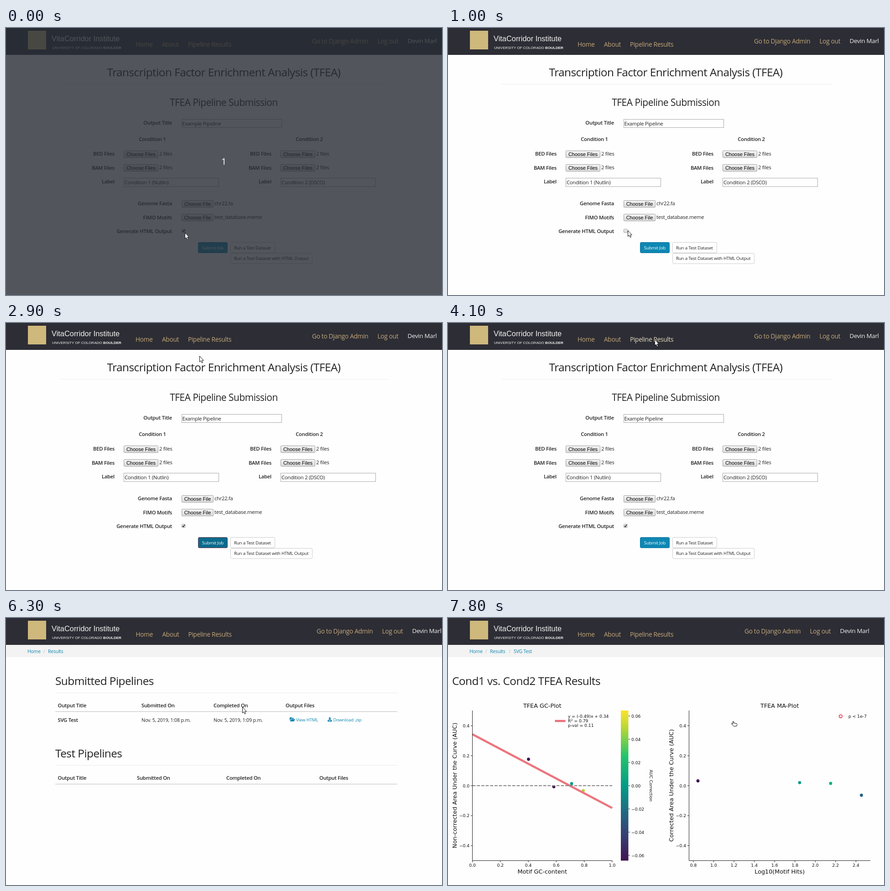
These frames come from a looping animation (956 by 586 pixels, 8 s). An HTML page:

```html
<!DOCTYPE html>
<html lang="en">
<head>
<meta charset="utf-8">
<title>Pipeline demo</title>
<style>
  html, body { margin: 0; width: 100%; height: 100%; overflow: hidden; background: #fefefe; }
  svg { display: block; width: 100vw; height: 100vh; }
  text { font: 11.2px "Open Sans", "Noto Sans", sans-serif; letter-spacing: -.0227em; fill: #222; white-space: pre; }
  .h1 { font-size: 24.4px; }
  .h2 { font-size: 20.9px; }
  .b { font-size: 11.3px; font-weight: 600; }
  .td { font-size: 10.8px; }
  .nav { font-size: 13.7px; fill: #c3a878; }
  .nav.hot { fill: #e8dcc0; }
  .user { font-size: 13.4px; fill: #eee; }
  .small { font-size: 9.8px; }
  .crumb { font-size: 10.5px; }
  .link { fill: #0f87b0; }
  .sep { fill: #bbb; }
  .white { fill: #fff; }
  .sys { font: 11px "Liberation Sans", Arial, sans-serif; letter-spacing: 0; fill: #000; }
  .brand { font: 16.4px "Liberation Sans", Arial, sans-serif; letter-spacing: 0; fill: #f2f2f2; }
  .uni { font: 8.05px "Liberation Sans", Arial, sans-serif; letter-spacing: 0; fill: #f2f2f2; }
  .plot text { font: 9.2px "DejaVu Sans", sans-serif; letter-spacing: 0; fill: #111; }
  .plot .label { font-size: 12.8px; }
  .end { text-anchor: end; }
  .mid { text-anchor: middle; }
  .field { fill: #fff; stroke: #a9a9a9; }
  .key { fill: url(#key); stroke: #a0a0a0; }
  .ghost { fill: #fff; stroke: #ccc; }
  .axis { fill: none; stroke: #222; stroke-width: 1; }
  #submit { fill: #0f87b3; stroke: #0b76a0; }
  #submit.hot { fill: #0b6b8c; }
  #submit.focus { fill: #0b6b8c; stroke: #75384b; }
</style>
</head>
<body>
<svg id="stage" viewBox="0 0 956 586" preserveAspectRatio="none">
  <defs>
    <linearGradient id="key" x2="0" y2="1">
      <stop stop-color="#f4f4f4"/><stop offset="1" stop-color="#dadada"/>
    </linearGradient>
    <linearGradient id="viridis" x2="0" y2="1">
      <stop stop-color="#fde32b"/><stop offset=".12" stop-color="#b5d635"/>
      <stop offset=".3" stop-color="#26c46c"/><stop offset=".5" stop-color="#049c86"/>
      <stop offset=".66" stop-color="#1f6d82"/><stop offset=".82" stop-color="#364276"/>
      <stop offset="1" stop-color="#401550"/>
    </linearGradient>
  </defs>
  <g id="form"></g>
  <g id="list"></g>
  <g id="plots"></g>
  <g id="dim">
    <rect width="956" height="586" fill="#272c34" fill-opacity=".8"/>
    <text x="477.5" y="300" class="mid white" style="font-size:20px">1</text>
  </g>
  <g id="cursor">
    <path id="arrow" d="M.5 .5V13.5L3.4 10.9 5.4 15.6 7.6 14.7 5.6 10.1H9.3Z" fill="#fff" stroke="#111"/>
    <path id="hand" d="M.5 1.2Q1.4 -.4 2.4 1V4.4L9 5.5Q10 6 9.8 7.5L8.8 11.5H2.5L-2.4 6.5Q-2.6 4.8 -1 5.2L.5 6.5Z" fill="#fff" stroke="#111"/>
  </g>
</svg>
<script>
const $ = id => document.getElementById(id);
const text = (x, y, s, cls = '', extra = '') => `<text x="${x}" y="${y}" class="${cls}" ${extra}>${s}</text>`;
const rect = (x, y, w, h, cls, extra = '') => `<rect x="${x}" y="${y}" width="${w}" height="${h}" class="${cls}" ${extra}/>`;
const line = (x1, y1, x2, y2, color) => `<path d="M${x1} ${y1}L${x2} ${y2}" stroke="${color}"/>`;
const dot = (x, y, color) => `<circle cx="${x}" cy="${y}" r="3.4" fill="${color}"/>`;
const range = (n, fn) => Array.from({ length: n }, (_, i) => fn(i)).join('');

const header = (left, right) =>
  rect(0, 0, 956, 59, '', 'fill="#2d2d35"') +
  rect(48, 6, 40, 41, '', 'fill="#cfb87c"') +
  text(100, 29, 'VitaCorridor Institute', 'brand') +
  text(101, 45.5, 'UNIVERSITY OF COLORADO <tspan font-weight="700">BOULDER</tspan>', 'uni') +
  text(left, 41, 'Home', 'nav') + text(left + 58, 41, 'About', 'nav') +
  text(left + 115, 41, 'Pipeline Results', 'nav results') +
  text(right, 34, 'Go to Django Admin', 'nav') + text(right + 143.5, 34, 'Log out', 'nav') +
  text(right + 209.5, 33, 'Devin Marl', 'user');

const crumbs = last =>
  rect(0, 59, 956, 27, '', 'fill="#f3f3f3"') +
  text(47, 76.5, 'Home', 'crumb link') + text(82, 76.5, '/', 'crumb sep') +
  text(92, 76.5, 'Results', 'crumb link') +
  (last ? text(133.5, 76.5, '/', 'crumb sep') + text(144, 76.5, last, 'crumb link') : '');

const picker = (x, y, w, label, file) =>
  rect(x + .5, y + .5, w, 15, 'key', 'rx="1"') +
  text(x + .5 + w / 2, y + 11.5, label, 'sys mid') + text(x + w + 3, y + 10.5, file);

const condition = (dx, n, label) =>
  text(dx + 321, 248, 'Condition ' + n, 'b mid') +
  ['BED', 'BAM'].map((kind, i) =>
    text(dx + 238, 280 + i * 30.5, kind + ' Files', 'b end') +
    picker(dx + 258, 269 + i * 30, 75, 'Choose Files', '2 files')).join('') +
  text(dx + 238, 341, 'Label', 'b end') +
  rect(dx + 258.5, 329.5, 208, 18.5, 'field') + text(dx + 260, 343, label);

$('form').innerHTML = header(284, 671) +
  text(477.5, 106, 'Transcription Factor Enrichment Analysis (TFEA)', 'h1 mid') +
  line(117, 123.5, 840, 123.5, '#eee') +
  text(477.5, 170.5, 'TFEA Pipeline Submission', 'h2 mid') +
  text(364, 212, 'Output Title', 'b end') +
  rect(385.5, 200.5, 219, 18, 'field') + text(386.5, 213.5, 'Example Pipeline') +
  condition(0, 1, 'Condition 1 (Nutlin)') + condition(344, 2, 'Condition 2 (DSCO)') +
  text(364, 389, 'Genome Fasta', 'b end') + picker(385, 378, 69, 'Choose File', 'chr22.fa') +
  text(364, 419.5, 'FIMO Motifs', 'b end') + picker(385, 408, 69, 'Choose File', 'test_database.meme') +
  text(364, 450, 'Generate HTML Output', 'b end') +
  rect(385.5, 441.5, 7.5, 7.5, 'key', 'rx="1"') +
  '<path id="tick" d="M387 445.2L388.8 447.2 391.8 442.8" fill="none" stroke="#222" stroke-width="1.6"/>' +
  rect(421.5, 470.5, 64, 23, '', 'id="submit" rx="2.5"') + text(453.5, 485.5, 'Submit Job', 'small white mid') +
  rect(492.5, 470.5, 97, 23, 'ghost', 'rx="2.5"') + text(500, 485.5, 'Run a Test Dataset', 'small') +
  rect(492.5, 494.5, 179, 22.5, 'ghost', 'rx="2.5"') + text(500, 509, 'Run a Test Dataset with HTML Output', 'small');

const table = (y, title, columns) =>
  text(108, y, title, 'h1') + line(108, y + 17.5, 859, y + 17.5, '#eaeaea') +
  ['Output Title', 'Submitted On', 'Completed On', 'Output Files']
    .map((s, i) => text(columns[i], y + 49, s, 'b')).join('') +
  line(108, y + 58.5, 858, y + 58.5, '#bbb');

$('list').innerHTML = header(284.5, 681) + crumbs() +
  table(147, 'Submitted Pipelines', [113.5, 297, 455, 613]) +
  text(113.5, 227.5, 'SVG Test', 'b') +
  text(297, 227.5, 'Nov. 5, 2019, 1:08 p.m.', 'td') + text(455, 227.5, 'Nov. 5, 2019, 1:09 p.m.', 'td') +
  '<path class="link" d="M622 219Q622 218 623 218H626L627 219.3H631V221.3H625L622 225.5ZM625.4 222H634L631.4 227H622.6Z"/>' +
  text(636, 226.8, 'View HTML', 'small link') +
  '<path class="link" d="M708.7 217.5H711.3V221H713.6L710 224.6 706.4 221H708.7ZM705.3 224H708L710 225.8 712 224H714.7V227.3H705.3Z"/>' +
  text(717.5, 226.8, 'Download .zip', 'small link') +
  table(306, 'Test Pipelines', [113.5, 287, 483, 687]);

const signed = (v, digits) => v.toFixed(digits).replace('-', '\u2212');
const yAt = v => 368 - v * 329;
const axes = (x0, x1, title, xLabel, yLabel) =>
  `<path class="axis" d="M${x0} 203V532.5H${x1}"/>` +
  range(5, i => {
    const v = (i - 2) / 5, y = yAt(v);
    return line(x0 - 3.5, y, x0, y, '#222') + text(x0 - 6.5, y + 3.5, signed(v, 1), 'end');
  }) +
  text((x0 + x1) / 2, 197, title, 'label mid') +
  text((x0 + x1) / 2, 561, xLabel, 'label mid') +
  text(0, 0, yLabel, 'label mid', `transform="translate(${x0 - 35} 367.5) rotate(-90)"`);
const xTicks = (n, x, step, first) => range(n, i =>
  line(x + i * step, 532.5, x + i * step, 536, '#222') +
  text(x + i * step, 546, (first + i * .2).toFixed(1), 'mid'));

$('plots').innerHTML = header(284, 650) + crumbs('SVG Test') +
  text(9, 147, 'Cond1 vs. Cond2 TFEA Results', 'h1') +
  '<g class="plot">' +
  dot(176.5, 310, '#3f1254') + dot(232, 370.3, '#3f1254') +
  dot(271, 363.5, '#0a9d86') + dot(296.5, 379, '#b2d43a') +
  `<path d="M53.5 ${yAt(.343)}L360 ${yAt(-.149)}" stroke="#ea6f78" stroke-width="4.6" stroke-opacity=".95"/>` +
  '<path d="M53.5 368H360" stroke="#858585" stroke-width="1.8" stroke-dasharray="6.8 2.9"/>' +
  axes(53.5, 360, 'TFEA GC-Plot', 'Motif GC-content', 'Non-corrected Area Under the Curve (AUC)') +
  xTicks(6, 53.5, 61.3, 0) +
  '<path d="M234.5 226H257.5" stroke="#ea6f78" stroke-width="4.6"/>' +
  text(263, 218.5, 'y = (-0.49)x + 0.34') +
  text(263, 229.2, 'R<tspan dy="-3.2" font-size="6.4">2</tspan><tspan dy="3.2"> = 0.79</tspan>') +
  text(263, 239.3, 'p-val = 0.11') +
  rect(379, 203, 16.5, 329.5, '', 'fill="url(#viridis)"') +
  range(7, i => line(395.5, 215 + i * 51, 399, 215 + i * 51, '#222') +
    text(402, 218.5 + i * 51, signed(.06 - i * .02 + 1e-9, 2))) +
  text(0, 0, 'AUC Correction', 'mid', 'transform="translate(441.5 368) rotate(90)"') +
  axes(528.5, 926, 'TFEA MA-Plot', 'Log10(Motif Hits)', 'Corrected Area Under the Curve (AUC)') +
  xTicks(9, 538, 44.56, .8) +
  dot(548, 357.5, '#3f1254') + dot(771, 361.3, '#0a9d86') +
  dot(839, 363, '#10b07c') + dot(906.5, 389, '#1f6185') +
  '<circle cx="861" cy="215.7" r="3.3" fill="#fff" stroke="#d6152b" stroke-width="1.3"/>' +
  text(878, 219, 'p &lt; 1e-7') + '</g>';

// Pointer path: time, x, y
const path = [
  [0, 392, 449], [100, 389, 451], [300, 389, 451], [400, 394, 465], [600, 445, 476],
  [700, 462, 474], [800, 448, 451], [1000, 394, 444], [1200, 394, 444], [1500, 401, 462],
  [2000, 450, 477], [2200, 450, 477], [2300, 440, 455], [2500, 357, 243], [2600, 357, 243],
  [2900, 424, 72], [3100, 446, 42], [3400, 451, 37], [3900, 451, 37], [4100, 453, 36],
  [5000, 453, 36], [5600, 427, 67], [5700, 427, 67], [5900, 406, 121], [6000, 406, 124],
  [6300, 518, 195], [6500, 752, 227], [6700, 608, 227], [6800, 608, 227],
  [7000, 624, 226], [8000, 624, 226]
];
function pointer(t) {
  const i = path.findIndex(p => p[0] > t);
  const [t0, x0, y0] = path[i - 1], [t1, x1, y1] = path[i];
  const k = (t - t0) / (t1 - t0);
  return [x0 + (x1 - x0) * k, y0 + (y1 - y0) * k];
}
const show = (id, on) => $(id).style.display = on ? '' : 'none';
const results = document.querySelector('#form .results');

function draw() {
  const t = Math.floor(performance.now() % 8000 / 100) * 100;
  const [x, y] = pointer(t);
  show('form', t < 5000);
  show('list', t >= 5000 && t < 7400);
  show('plots', t >= 7400);
  show('dim', t < 100);
  show('tick', t < 1000 || t >= 1200);
  const overSubmit = t < 5000 && x > 421 && x < 486 && y > 470 && y < 494;
  $('submit').classList.toggle('hot', overSubmit);
  $('submit').classList.toggle('focus', t >= 2300 && t < 4000);
  const overResults = t < 5000 && x > 399 && y < 46;
  results.classList.toggle('hot', overResults);
  const overLink = overResults || t >= 7000 || (t > 6300 && t < 6700 && x > 621);
  const hand = overLink && t >= 6300;
  show('hand', hand);
  show('arrow', !hand);
  $('cursor').setAttribute('transform', `translate(${x} ${y})`);
  requestAnimationFrame(draw);
}
draw();
</script>
</body>
</html>
```
